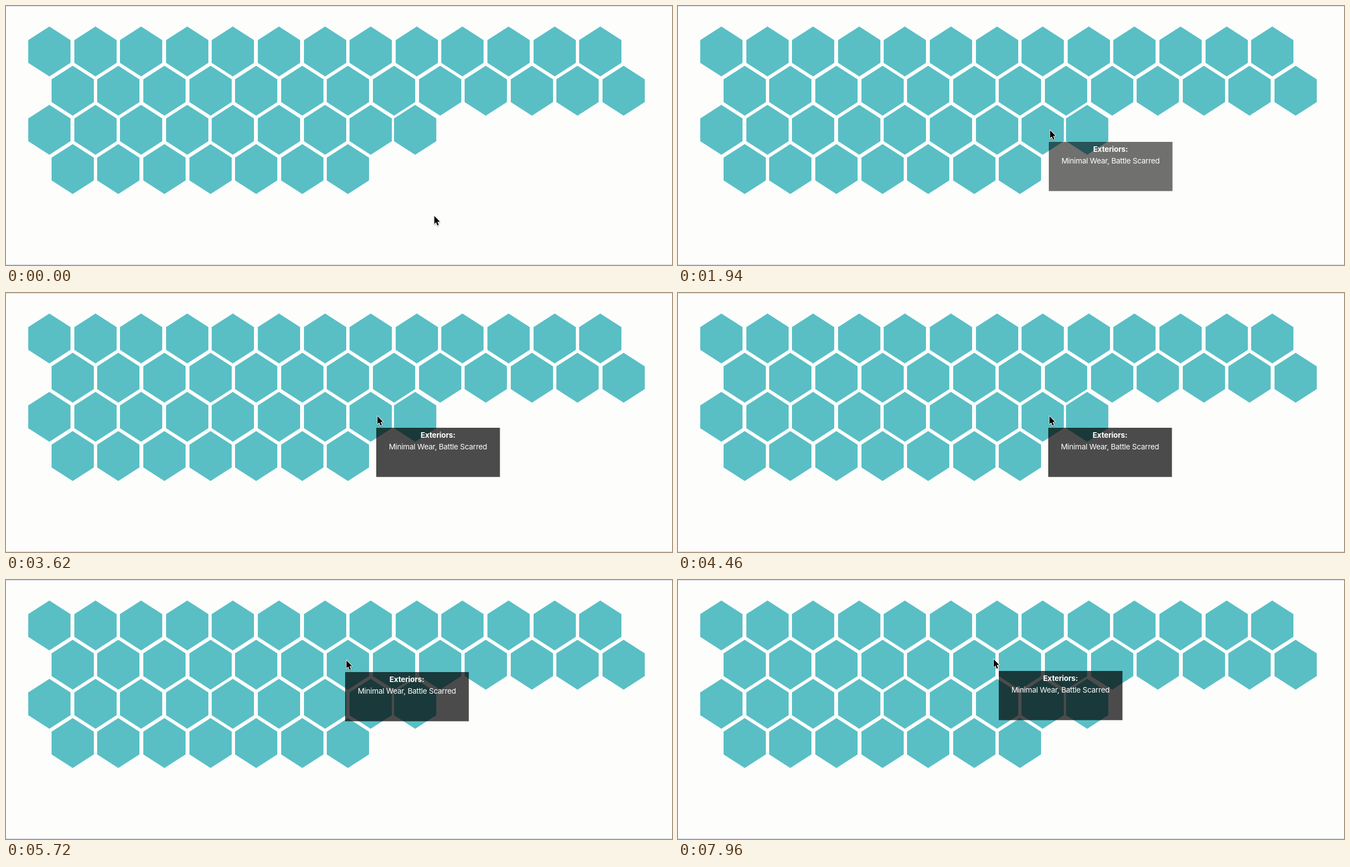
Write an HTML page with a canvas that moves like this. It is 1198 px wide and 467 px high and loops after 8 s.

```html
<!DOCTYPE html>
<html lang="en">
<head>
<meta charset="utf-8">
<title>Hexagon grid tooltip</title>
<style>
  html, body { margin: 0; width: 100%; height: 100%; overflow: hidden; background: #fdfdfc; }
  canvas { display: block; width: 1198px; height: 467px; }
</style>
</head>
<body>
<canvas id="stage"></canvas>
<script>
const W = 1198, H = 467, LOOP = 8000;
const canvas = document.getElementById('stage');
const ctx = canvas.getContext('2d');
const dpr = window.devicePixelRatio || 1;
canvas.width = W * dpr;
canvas.height = H * dpr;

const HEX_W = 76, HEX_H = 90, STEP = 82.58, ROW_STEP = 70.67;
const rowCounts = [13, 13, 9, 7];

// Each pointer move eases from the last place to (x, y)
const home = { x: 770, y: 378 };
const moves = [
  { from: 600, to: 1860, x: 668.8, y: 223.4 },
  { from: 2600, to: 3400, x: 667.7, y: 221.6 },
  { from: 4560, to: 5344, x: 612, y: 144.4 },
  { from: 6800, to: 7050, x: 602, y: 144.4 },
  { from: 7700, to: 8100, x: 554, y: 141.4 }
];
const LAG = 65, FADE_START = 1460, FADE = 606;

const clamp = v => Math.max(0, Math.min(1, v));
const ease = u => u * u * (3 - 2 * u);

function tipAt(t) {
  let { x, y } = home;
  for (const m of moves) {
    const k = ease(clamp((t - m.from) / (m.to - m.from)));
    x += (m.x - x) * k;
    y += (m.y - y) * k;
  }
  return { x, y };
}

function polygon(points) {
  ctx.beginPath();
  for (const [x, y] of points) ctx.lineTo(x, y);
  ctx.closePath();
}

function drawHex(left, top) {
  const right = left + HEX_W, mid = left + HEX_W / 2;
  const upper = top + 24.5, lower = top + HEX_H - 24.5;
  polygon([[mid, top], [right, upper], [right, lower],
    [mid, top + HEX_H], [left, lower], [left, upper]]);
  ctx.fill();
}

function drawGrid() {
  ctx.fillStyle = '#fdfdfc';
  ctx.fillRect(0, 0, W, H);
  ctx.fillStyle = '#d6d6de';
  ctx.fillRect(0, 0, W, 1);
  ctx.fillRect(0, H - 1, W, 1);
  ctx.fillStyle = '#59bfc5';
  rowCounts.forEach((count, r) => {
    const start = r % 2 ? 82.4 : 40.65;
    for (let i = 0; i < count; i++) {
      const nudge = r === 2 && i === 8 ? 3 : 0;
      drawHex(Math.floor(start + i * STEP) - nudge, 37 + r * ROW_STEP);
    }
  });
}

function drawLabel(text, y, weight, spacing) {
  ctx.font = weight + ' 13.6px Inter, "Open Sans", sans-serif';
  ctx.letterSpacing = spacing;
  ctx.fillText(text, 111, y);
}

function drawTooltip(t) {
  const alpha = clamp((t - FADE_START) / FADE);
  if (!alpha) return;
  const { x, y } = tipAt(t - LAG);
  ctx.save();
  ctx.translate(Math.round(x - 2), Math.round(y + 21.5));
  ctx.fillStyle = `rgba(0, 0, 0, ${0.7 * alpha})`;
  ctx.fillRect(0, 0, 222.5, 88.7);
  ctx.fillStyle = '#fff';
  ctx.textAlign = 'center';
  drawLabel('Exteriors:', 18, 700, '-0.2px');
  drawLabel('Minimal Wear, Battle Scarred', 39, 400, '-0.3px');
  ctx.restore();
}

function drawPointer(t) {
  const { x, y } = tipAt(t);
  ctx.save();
  ctx.translate(x + 0.5, y + 0.5);
  polygon([[0, 0], [0, 14.4], [3.2, 11.4], [5.5, 17], [7.9, 16], [5.5, 10.6], [10, 10.4]]);
  ctx.lineJoin = 'round';
  ctx.lineWidth = 2;
  ctx.strokeStyle = '#fff';
  ctx.shadowColor = 'rgba(0, 0, 0, 0.35)';
  ctx.shadowBlur = 2 * dpr;
  ctx.shadowOffsetY = dpr;
  ctx.stroke();
  ctx.shadowColor = 'transparent';
  ctx.fillStyle = '#000';
  ctx.fill();
  ctx.restore();
}

function draw(now) {
  const t = now % LOOP;
  ctx.setTransform(dpr, 0, 0, dpr, 0, 0);
  drawGrid();
  drawTooltip(t);
  drawPointer(t);
}

const start = performance.now();
function frame() {
  draw(performance.now() - start);
  requestAnimationFrame(frame);
}
frame();
</script>
</body>
</html>
```
